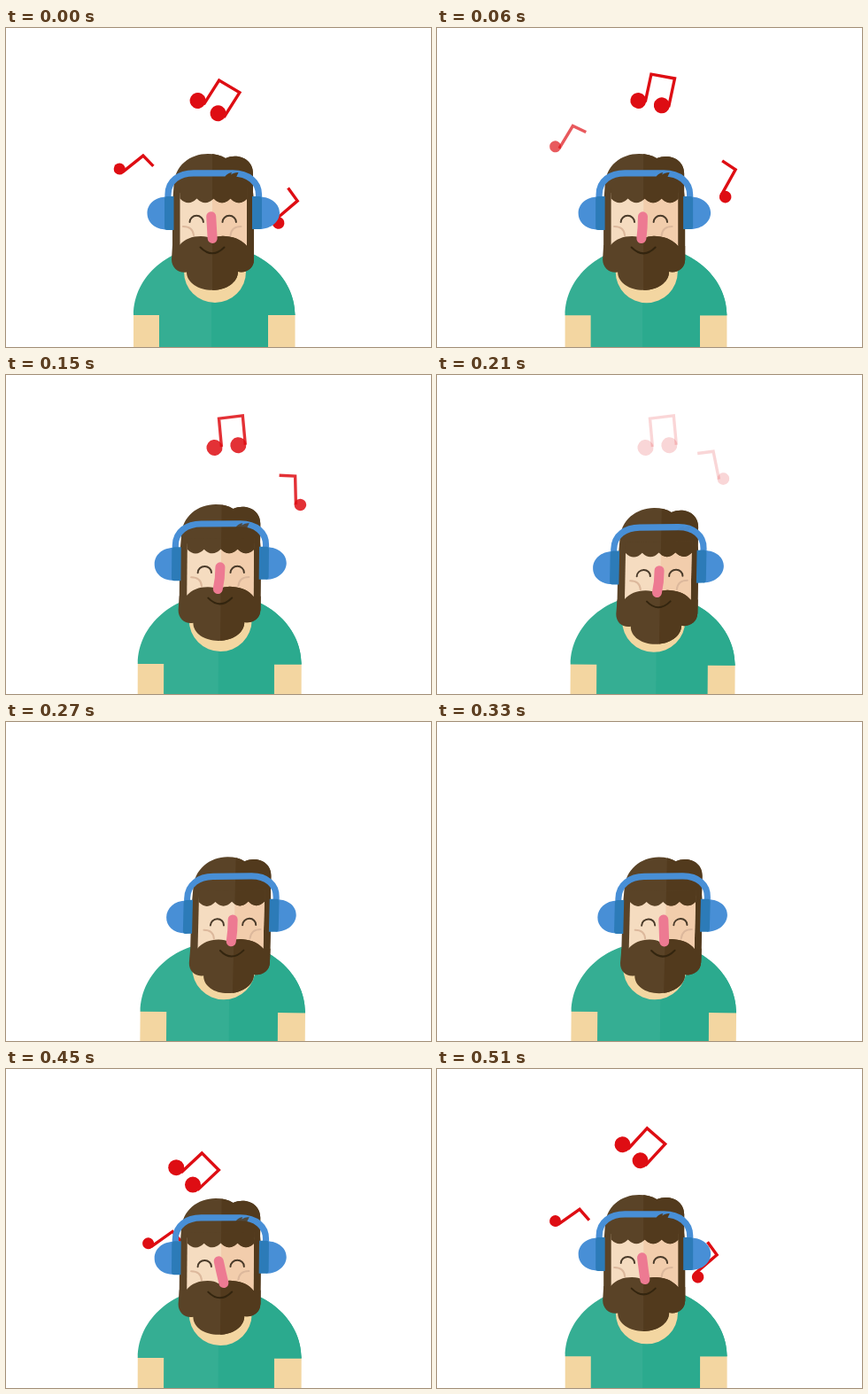
An HTML page with a canvas for the animation above (0.54 s loop, 480 by 360 pixels).

```html
<!DOCTYPE html>
<html lang="en">
<head>
<meta charset="utf-8">
<title>Listening to music</title>
<style>
html, body { margin: 0; width: 100%; height: 100%; overflow: hidden; background: #fff; }
canvas { display: block; }
</style>
</head>
<body>
<canvas id="stage" width="480" height="360"></canvas>
<script>
const ctx = document.getElementById('stage').getContext('2d');
const LOOP = 540, STEP = 30, NOTES_START = 390;
const SKIN = '#f3d6a1', BLUE = '#488fd6', PAD = '#2c7bb8', RED = '#de0d13', HAIR = '#523a1d';

const clamp = v => Math.max(0, Math.min(1, v));
const square = v => v * v;
const ease = (t, from, to) => (1 - Math.cos(Math.PI * clamp((t - from) / (to - from)))) / 2;

function fill(color, path) {
  ctx.fillStyle = color;
  ctx.fill(new Path2D(path));
}

function line(color, width, path) {
  ctx.strokeStyle = color;
  ctx.lineWidth = width;
  ctx.stroke(new Path2D(path));
}

function dot(color, x, y, r) {
  ctx.fillStyle = color;
  ctx.beginPath();
  ctx.arc(x, y, r, 0, 7);
  ctx.fill();
}

// Run a drawing with its own canvas state
function layer(drawing) {
  ctx.save();
  drawing();
  ctx.restore();
}

// Fill a shape in two tones, divided at x
function twoTone(path, x, left, right) {
  fill(left, path);
  layer(() => {
    ctx.clip(new Path2D(path));
    ctx.fillStyle = right;
    ctx.fillRect(x, 0, 480, 400);
  });
}

// Each note flies along a parabola and starts to turn upright at turnAt
const notes = [
  { x: u => 236 - 0.0006 * square(u - 330), y: u => 82 + 0.0036 * square(Math.max(0, 150 - u)),
    turn: 45, turnAt: 108, end: 375, r: 9, gap: 27, stem: 'M8 0 L9 -32 H36 L35 1' },
  { x: u => 127.5 + 0.003 * square(u - 165), y: u => 222 - 0.42 * u,
    turn: 49, turnAt: 140, end: 270, r: 6.5, gap: 0, stem: 'M5 0 L8 -29.5 H24.5' },
  { x: u => 333 - 0.0015 * square(u - 280), y: u => 293.5 - 0.49 * u,
    turn: 54, turnAt: 150, end: 375, r: 6.8, gap: 0, stem: 'M-5 0 L-7.5 -32 H-25.5' }
];

function drawNote(note, u) {
  if (u < STEP || u >= note.end) return;
  const angle = Math.max(-7, note.turn - 0.34 * Math.max(0, u - note.turnAt));
  layer(() => {
    ctx.globalAlpha = clamp((note.end - u) / 88);
    ctx.translate(note.x(u), note.y(u));
    ctx.rotate(angle * Math.PI / 180);
    line(RED, 3.4, note.stem);
    dot(RED, 0, 0, note.r);
    if (note.gap) dot(RED, note.gap, 0.5, note.r);
  });
}

function drawBody(lean) {
  const x = 9.6 * Math.sqrt(lean), scale = 1 + x * 0.0022;
  ctx.translate(235 + x, 324 + x * 0.37);
  ctx.rotate(0.008 * lean);
  ctx.scale(scale, scale);
  ctx.translate(-235, -324);
  fill(SKIN, 'M144 323 H174 V370 H144Z M295 323 H326.5 V370 H295Z');
  twoTone('M144 324 C144 280 185 245.5 235 245.5 S326.5 280 326.5 324 H296 V370 H173 V324Z',
    232 + 20 * lean - x, '#35ae93', '#2baa8e');
  dot(SKIN, 236, 275, 35);
}

function drawFace(lean) {
  ctx.translate(3 * lean, 0);
  ctx.lineCap = 'round';
  line('#4a3b2a', 2, 'M207.5 219 a7.7 7.2 0 0 1 15.4 0 M244.5 219 a7.7 7.2 0 0 1 15.4 0');
  line('#dcb89c', 2, 'M200 224 Q211 224 212 234 M265.5 224 Q254.5 224 253.5 234');
  line('#33250f', 2, 'M219.5 247.5 Q233 261 246.5 247.5');
}

function drawHeadphones() {
  line(BLUE, 7.2, 'M183 195 V188 C183 172 196 163.8 212 163.8 H256 C274 163.8 285.5 174 285.5 188 V195');
  fill(BLUE, 'M182 190.5 C168 190.5 159.5 199 159.5 209 S168 227.5 182 227.5Z ' +
    'M286 190.5 C300 190.5 309 199 309 208.5 S300 227 286 227Z');
  fill(PAD, 'M179 193 q0 -3 3 -3 H189.5 V228 H182 q-3 0 -3 -3Z ' +
    'M278 190 H286 q3 0 3 3 V224 q0 3 -3 3 H278Z');
}

function drawHead(lean) {
  const split = 233 + 5 * lean;
  const hair = path => twoTone(path, split, '#5a4327', HAIR);
  ctx.translate(234 + 19.6 * lean, 240 + 10.4 * lean);
  ctx.transform(1 - 0.02 * square(lean), -0.012 * lean, -0.025 * lean, 1, 0, 0);
  ctx.translate(-234, -240);

  hair('M188 262 V200 L189.5 178 C190 155 208 142 228 142 Q240 142 248 147 ' +
    'C262 141 279 148 279 164 V185 L280 200 V262Z');
  twoTone('M196.5 186 H272 V255 H196.5Z', split, '#f5dcc0', '#f2cdac');
  hair('M196 180 H272.5 V192.5' + ' q-9.5 9.5 -19 0'.repeat(4) + 'Z');
  hair('M188 245 H196 C202 238 210 235 220 235 Q228 235 232 238 Q240 234 248 235 ' +
    'C260 236 267 240 272 246 H280 V262 C280 271 271 277 262 275 ' +
    'C262 287 249 295.8 233 295.8 S204 287 204 275.5 C195 277 187 271 187 261Z');
  layer(() => drawFace(lean));
  drawHeadphones();

  // The loose tuft turns out of sight as the head leans
  ctx.globalAlpha = clamp(1.6 - 2 * lean);
  ctx.translate(10 * lean, 0);
  fill(HAIR, 'M247 168.5 Q249 164 255 163 L254 165.5 Q257 163 262.5 163 L260 168.5Z');
}

function drawNose(t, lean) {
  const a = 2 * Math.PI * (t - 440) / LOOP;
  const tilt = 0.5 + 4.2 * (Math.cos(a) + 0.25 * Math.cos(2 * a));
  const middle = 232 + 24 * lean + 0.3 * tilt;
  const top = middle - tilt / 2, tip = middle + tilt / 2;
  ctx.translate(0, 10.4 * lean);
  ctx.lineCap = 'round';
  line('#ed7a92', 11, `M${top} 212.7 Q${Math.max(top, middle)} 226 ${tip} 237.5`);
}

function draw(now) {
  const t = Math.floor(now / STEP) * STEP % LOOP;
  const u = (t + LOOP - NOTES_START) % LOOP;
  const lean = ease(t, 48, 285) - ease(t, 357, 520);
  ctx.fillStyle = '#fff';
  ctx.fillRect(0, 0, 480, 360);
  notes.forEach(note => drawNote(note, u));
  layer(() => drawBody(lean));
  layer(() => drawHead(lean));
  layer(() => drawNose(t, lean));
}

const begin = performance.now();
function tick() {
  draw(performance.now() - begin);
  requestAnimationFrame(tick);
}
tick();
</script>
</body>
</html>
```
